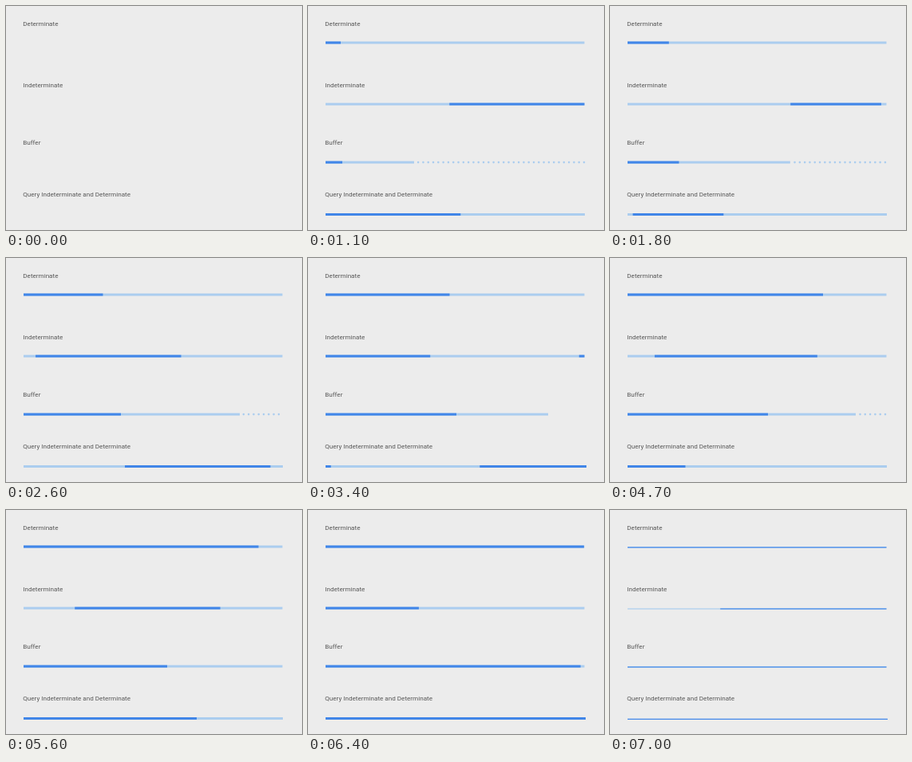
These frames come from a looping animation (371 by 281 pixels, 7.1 s). An HTML page with a canvas:

```html
<!DOCTYPE html>
<html lang="en">
<head>
<meta charset="utf-8">
<title>Linear progress indicators</title>
<style>
html, body { margin: 0; width: 100%; height: 100%; overflow: hidden; background: #ececec; }
canvas { display: block; }
</style>
</head>
<body>
<canvas id="stage" width="371" height="281"></canvas>
<script>
const ctx = document.getElementById('stage').getContext('2d');
const LOOP = 7100, STEP = 100;
const LEFT = 22, RIGHT = 346.5, WIDTH = RIGHT - LEFT;
const BLUE = '#4186e8', PALE = '#abcdef', BACK = '#ececec';

const clamp = v => Math.min(1, Math.max(0, v));
const part = (t, from, to) => clamp((t - from) / (to - from));
const easeOut = u => 1 - Math.pow(1 - u, 1.55);
const smooth = u => u * u * (3 - 2 * u);

// Monotone cubic curve through [time, value] keys.
function curve(keys) {
  const slope = i => (keys[i + 1][1] - keys[i][1]) / (keys[i + 1][0] - keys[i][0]);
  const tangent = i => {
    if (i === 0) return slope(0);
    if (i === keys.length - 1) return 0;
    const a = slope(i - 1), b = slope(i);
    return a * b > 0 ? 2 * a * b / (a + b) : 0;
  };
  return t => {
    if (t <= keys[0][0]) return keys[0][1];
    const i = keys.findIndex(k => k[0] >= t) - 1;
    if (i < 0) return keys[keys.length - 1][1];
    const [t0, v0] = keys[i], [t1, v1] = keys[i + 1];
    const d = t1 - t0, u = (t - t0) / d, s = smooth(u);
    return v0 + (v1 - v0) * s
      + d * u * (1 - u) * ((1 - u) * tangent(i) - u * tangent(i + 1));
  };
}

const determinate = curve([[400, 22], [1100, 41], [2600, 121.5], [3400, 177.5],
  [4700, 267], [5600, 316.5], [6500, RIGHT]]);
const played = curve([[400, 22], [1100, 43], [2600, 144], [3400, 186],
  [4700, 198], [5600, 202], [6500, RIGHT]]);
const buffered = curve([[300, 22], [1100, 133], [2600, 293], [3400, 301],
  [4700, 308], [5400, RIGHT]]);
const answered = curve([[4110, 22], [4700, 94.5], [5600, 239], [6400, 348]]);

// A long and a short segment per two-second cycle, as [tail, head] fractions.
function segments(t) {
  const p = (t - 110 + 2000) % 2000;
  const u = part(p, 400, 1300);
  return [
    [0.45 * u + 0.55 * Math.pow(u, 2.6), part(p, 0, 805)],
    [easeOut(part(p, 1412, 2000)), easeOut(part(p, 1111, 1741))]
  ];
}

function render(t) {
  ctx.fillStyle = BACK;
  ctx.fillRect(0, 0, 371, 281);

  ctx.fillStyle = '#575757';
  ctx.font = '8.1px Roboto, sans-serif';
  ctx.fillText('Determinate', 21.3, 24.5);
  ctx.fillText('Indeterminate', 21.3, 101.8);
  ctx.fillText('Buffer', 21.3, 173.7);
  ctx.fillText('Query Indeterminate and Determinate', 21.3, 239.3);

  const height = 3 * part(t, 0, 400) * (1 - 0.6 * part(t, 6700, 7000));
  if (height <= 0) return;
  const bar = (from, to, bottom, color) => {
    if (to <= from) return;
    ctx.fillStyle = color;
    ctx.fillRect(from, bottom - height, to - from, height);
  };

  bar(LEFT, RIGHT, 47.5, PALE);
  bar(LEFT, determinate(t), 47.5, BLUE);

  bar(LEFT, RIGHT, 124.6, PALE);
  for (const [tail, head] of segments(t))
    bar(LEFT + WIDTH * tail, LEFT + WIDTH * head, 124.6, BLUE);

  const edge = buffered(t);
  const gap = 6.3;
  const drift = 0.01953 * (t - 1100) % gap;
  const cycle = (t + 1100) % 3000;
  ctx.globalAlpha = smooth(part(Math.abs(cycle - 1500), 150, 600));
  ctx.fillStyle = PALE;
  for (let x = 346 - drift + gap; x > edge + 3; x -= gap) {
    if (x > 346.2) continue;
    ctx.beginPath();
    ctx.ellipse(x, 197.6 - height / 2, 1.3, 1.3 * height / 3, 0, 0, 2 * Math.PI);
    ctx.fill();
  }
  ctx.globalAlpha = 1;
  bar(LEFT, edge, 197.6, PALE);
  bar(LEFT, played(t), 197.6, BLUE);

  bar(LEFT, 347, 263, PALE);
  if (t < 4110) {
    for (const [tail, head] of segments(t)) {
      const right = tail > 0 ? RIGHT - WIDTH * tail : 349;
      if (head > 0) bar(RIGHT - WIDTH * head, right, 263, BLUE);
    }
  } else {
    bar(LEFT, answered(t), 263, BLUE);
  }
}

const start = performance.now();
function tick() {
  const t = (performance.now() - start) % LOOP;
  render(Math.floor(t / STEP) * STEP);
  requestAnimationFrame(tick);
}
tick();
</script>
</body>
</html>
```
